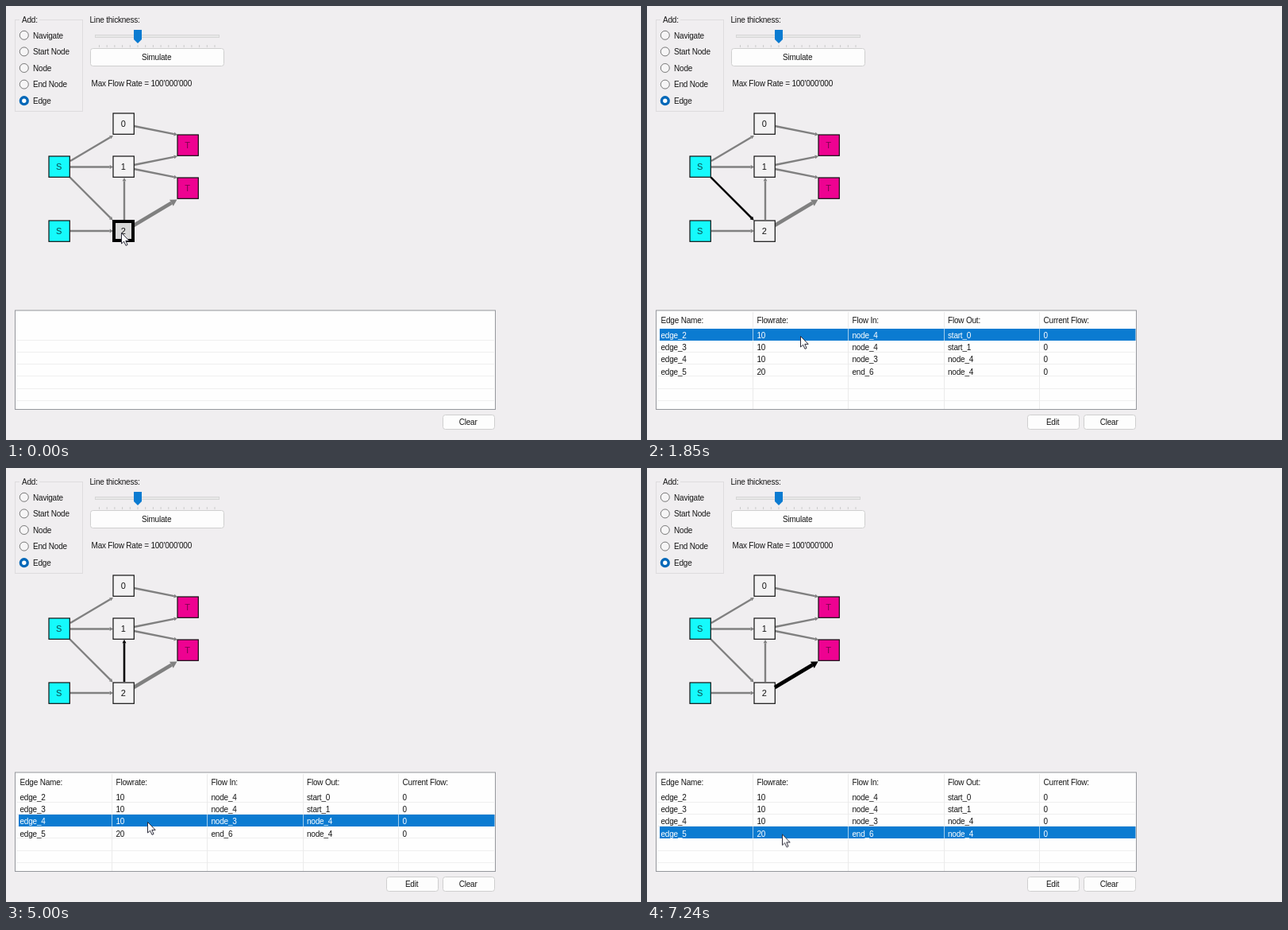
Recreate the animation shown at these times as an HTML page. Size 800 px wide and 546 px high, loop 7.36 s.

```html
<!DOCTYPE html>
<html lang="en">
<head>
<meta charset="utf-8">
<title>Flow network editor</title>
<style>
html, body { margin: 0; width: 100%; height: 100%; overflow: hidden; background: #f0eef0; }
svg { display: block; width: 800px; height: 546px; }
text { font: 10px "Liberation Sans", Arial, sans-serif; letter-spacing: -.2px; fill: #161616; white-space: pre; }
.mid { text-anchor: middle; }
.label { font-size: 11px; letter-spacing: 0; text-anchor: middle; }
.picked text { fill: #fff; }

.timed { animation: 7360ms step-end infinite; }
.filled { animation-name: filled; }
.focus { animation-name: focus; }
.edit { animation-name: edit; }
.pick0 { animation-name: pick0; }
.pick1 { animation-name: pick1; }
.pick2 { animation-name: pick2; }
.pick3 { animation-name: pick3; }
@keyframes filled { 0% { opacity: 0 } 4.07%, 100% { opacity: 1 } }
@keyframes focus { 0% { opacity: 1 } 25.13%, 100% { opacity: 0 } }
@keyframes edit { 0% { opacity: 0 } 25.13%, 100% { opacity: 1 } }
@keyframes pick0 { 0% { opacity: 0 } 25.13% { opacity: 1 } 46.05%, 100% { opacity: 0 } }
@keyframes pick1 { 0% { opacity: 0 } 46.05% { opacity: 1 } 67.93%, 100% { opacity: 0 } }
@keyframes pick2 { 0% { opacity: 0 } 67.93% { opacity: 1 } 93.06%, 100% { opacity: 0 } }
@keyframes pick3 { 0% { opacity: 0 } 93.06%, 100% { opacity: 1 } }

.cursor { animation: cursor 7360ms linear infinite; }
@keyframes cursor {
  0% { transform: translate(145px, 285px); animation-timing-function: step-end }
  .4% { transform: translate(142px, 284px) }
  8.83% { transform: translate(142px, 284px); animation-timing-function: ease-in-out }
  20.1%, 35.05% { transform: translate(193px, 415px) }
  44.43%, 60.87% { transform: translate(187px, 428px) }
  65.08%, 80.3% { transform: translate(178px, 445px) }
  81.5%, 100% { transform: translate(170px, 460.5px) }
}
</style>
</head>
<body>
<svg id="stage" viewBox="0 0 800 546"></svg>
<script>
const BLUE = '#0b7bd1', GREY = '#808080';
const ROW_TOP = 406, ROW_H = 15.3;
const COL_LINES = [133.5, 253.5, 374.5, 494.5];
const COL_TEXT = [17.5, 138.5, 258.5, 379, 499.5];
const HEADS = ['Edge Name:', 'Flowrate:', 'Flow In:', 'Flow Out:', 'Current Flow:'];
const ROWS = [
  ['edge_2', '10', 'node_4', 'start_0', '0'],
  ['edge_3', '10', 'node_4', 'start_1', '0'],
  ['edge_4', '10', 'node_3', 'node_4', '0'],
  ['edge_5', '20', 'end_6', 'node_4', '0']
];
// x1, y1, x2, y2, width; the first four belong to the table rows
const EDGES = [
  [80.5, 215.5, 134.5, 269.5, 2.4], [81, 283, 135, 283, 2.4],
  [149, 269, 149, 216, 2.4], [161, 276, 215.5, 243.5, 4.6],
  [81, 195, 135, 163, 2.4], [81, 202.5, 135, 202.5, 2.4],
  [161, 151, 216, 162, 2.4], [161, 200, 216, 189, 2.4], [161, 205, 216, 216, 2.4]
];
const NODES = [
  [67, 202, 'S'], [67, 283, 'S'], [148, 148, '0'], [148, 202, '1'],
  [148, 283, '2'], [229, 175, 'T'], [229, 229, 'T']
];
const SKIN = { S: ['#15fafc', '#0b4a4d'], T: ['#ee0291', '#7c064e'] };

const text = (x, y, s, cls = '') => `<text x="${x}" y="${y}" class="${cls}">${s}</text>`;
const rect = (x, y, w, h, fill, stroke = 'none', more = '') =>
  `<rect x="${x}" y="${y}" width="${w}" height="${h}" fill="${fill}" stroke="${stroke}" ${more}/>`;
const line = (x1, y1, x2, y2, color, width = 1) =>
  `<path d="M${x1} ${y1}L${x2} ${y2}" stroke="${color}" stroke-width="${width}"/>`;
const group = (cls, ...parts) => `<g class="${cls}">${parts.join('')}</g>`;

function edge([x1, y1, x2, y2, w], color) {
  const len = Math.hypot(x2 - x1, y2 - y1);
  const ux = (x2 - x1) / len, uy = (y2 - y1) / len;
  const bx = x2 - ux * w * 1.8, by = y2 - uy * w * 1.8;
  const side = k => `${bx - uy * w * k} ${by + ux * w * k}`;
  return line(x1, y1, bx, by, color, w) +
    `<path d="M${x2} ${y2}L${side(1)}L${side(-1)}Z" fill="${color}"/>`;
}

function node([x, y, name]) {
  const [fill, ink] = SKIN[name] || ['#f3f2f3', '#161616'];
  return rect(x - 13, y - 13, 26.3, 26.3, fill, '#111', 'stroke-width="1.2"') +
    `<text x="${x - .3}" y="${y + 3.7}" class="label" style="fill:${ink}">${name}</text>`;
}

function radio(name, i) {
  const y = 36.8 + i * 20.6, on = name === 'Edge';
  return `<circle cx="22.8" cy="${y}" r="${on ? 4.4 : 5.5}" fill="${on ? '#fff' : '#f6f5f6'}"
    stroke="${on ? '#0067b8' : '#777'}" stroke-width="${on ? 3.4 : 1}"/>` + text(34, y + 3.7, name);
}

const button = (x, y, w, h, name) =>
  rect(x + .5, y + .5, w, h, '#fdfdfd', '#cfcfcf', 'rx="3"') + text(x + w / 2 - .4, y + h / 2 + 4.2, name, 'mid');

const cells = (row, y) => row.map((s, i) => text(COL_TEXT[i], y, s)).join('');
const rowText = i => cells(ROWS[i], 417.6 + i * ROW_H);
const colLines = (y1, y2, color) => COL_LINES.map(x => line(x, y1, x, y2, color)).join('');

function picked(i) {
  const y = Math.floor(ROW_TOP + i * ROW_H);
  return group(`timed picked pick${i}`,
    edge(EDGES[i], '#000'),
    rect(16, y, 599.5, 15, BLUE),
    colLines(y, y + 15, '#a4cdec'),
    rowText(i));
}

const options = group('',
  rect(11.5, 17.5, 85, 115, 'none', '#dedcde'),
  rect(17, 13, 25, 10, '#f0eef0'),
  text(20, 21.2, 'Add:'),
  ...['Navigate', 'Start Node', 'Node', 'End Node', 'Edge'].map(radio));

const slider = group('',
  text(105.5, 21.2, 'Line thickness:'),
  rect(112.5, 36.5, 156, 3, '#e8e8e8', '#d6d6d6'),
  ...Array.from({ length: 16 }, (_, i) => line(117.5 + i * 9.7, 49, 117.5 + i * 9.7, 52, '#cbcbcb')),
  `<path d="M161 30H171V42L166 47L161 42Z" fill="${BLUE}"/>`);

const table = group('',
  rect(11.5, 383, 605, 124.5, '#fefefe', '#95979c'),
  ...Array.from({ length: 6 }, (_, i) => {
    const y = Math.floor(420 + i * ROW_H) + .5;
    return line(13, y, 615, y, '#efefef');
  }),
  group('timed filled', colLines(385, 507, '#ebebeb'), cells(HEADS, 398.7), ...ROWS.map((_, i) => rowText(i))));

const focus = group('timed focus',
  rect(136, 271, 24, 24, '#d9d9d9', '#000', 'stroke-width="4"'),
  text(147.7, 286.7, '2', 'label'));

const cursor = group('cursor',
  `<path d="M.5 .5V14L3.6 11.2L6 16.4L8.1 15.4L5.8 10.4H10.2Z" fill="#fff" stroke="#2c2c3a" stroke-width="1"/>`);

document.getElementById('stage').innerHTML = [
  options, slider,
  button(106, 53, 168, 22, 'Simulate'),
  text(107.5, 100.6, "Max Flow Rate = 100'000'000"),
  ...EDGES.map(e => edge(e, GREY)),
  ...NODES.map(node),
  table,
  ...ROWS.map((_, i) => picked(i)),
  focus,
  group('timed edit', button(479, 514, 65, 18, 'Edit')),
  button(550, 514, 65, 18, 'Clear'),
  cursor
].join('');
</script>
</body>
</html>
```
